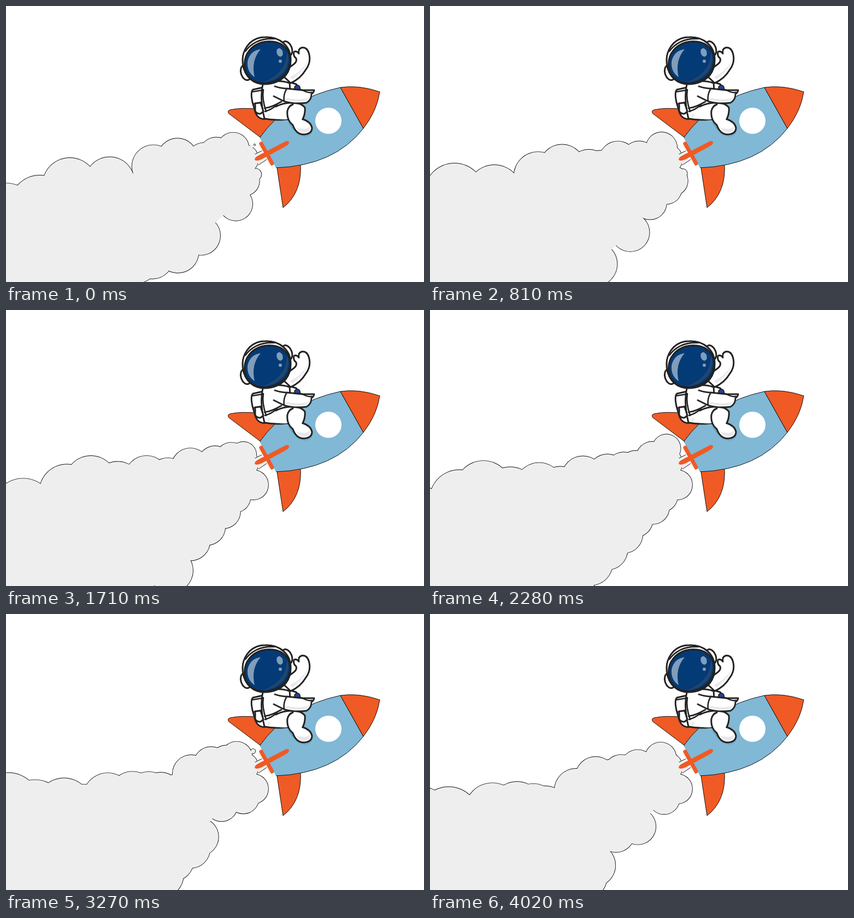
An HTML page with a canvas that plays this animation: 765x505 px, repeating every 4080 ms.

```html
<!DOCTYPE html>
<html lang="en">
<head>
<meta charset="utf-8">
<title>Rocket ride</title>
<style>
  html, body { margin: 0; width: 100%; height: 100%; overflow: hidden; background: #fff; }
  canvas, svg { position: absolute; left: 0; top: 0; }
  .edge { stroke: #111; stroke-width: 1; }
  .suit { fill: #fff; stroke: #222; stroke-width: 3; stroke-linejoin: round; stroke-linecap: round; }
  .line { fill: none; stroke: #222; stroke-width: 2.6; stroke-linecap: round; }
  .shade { fill: #e8e8e8; }
  .red { fill: #f05a24; }
</style>
</head>
<body>
<canvas id="smoke" width="765" height="505"></canvas>
<svg width="765" height="505" viewBox="0 0 765 505">
  <!-- rocket -->
  <path fill="#eee" d="M456 271L468 265L478 281L462 291Z"/>
  <path class="line" style="stroke-width:1" d="M456 271L468 265M462 291L477 281"/>
  <path class="red edge" d="M465 240L408 197Q404 192 410 190Q432 185 465 189L494 208Z"/>
  <path class="red edge" d="M496 296L507 369Q542 342 539 289Z"/>
  <path class="edge" fill="#80b8d6" d="M465 240Q515 170 612 149L654 224Q601 292 495 296Z"/>
  <path class="red edge" d="M612 149Q646 144 684 157Q679 192 654 224Z"/>
  <path stroke="#80b8d6" stroke-width="3" d="M466.500 241L495 294.500"/>
  <circle cx="590" cy="210" r="24" fill="#fff"/>
  <path class="red" d="M463 252Q464 248 469 248L491 288Q490 292 485 292Z"/>
  <path class="red" d="M455 281Q455 277 463 273L511 248Q518 245 518 250Q518 253 513 256L467 281Q457 285 455 281Z"/>

  <!-- astronaut -->
  <path fill="#6fa5c3" d="M516 213Q530 238 550 239Q561 235 561 226Z"/>
  <path class="suit" d="M470 149L452 153Q447 157 451 176L457 196Q461 206 472 207L486 204Z"/>
  <path class="suit" d="M518 139L531 143L538 152L520 160Z"/>
  <path class="suit" d="M503 124L526 107Q533 102 531 96Q525 91 527 84Q531 81 536 87Q534 78 542 76Q552 75 555 89Q558 104 549 116Q539 133 521 141Z"/>
  <path class="shade" d="M551 101Q547 117 524 134L520 130Q542 119 551 101Z"/>
  <path class="suit" d="M470 143Q464 170 473 206Q492 210 517 207L522 180L519 141Q496 133 470 143Z"/>
  <path class="shade" d="M479 197Q494 202 515 193L516 204Q495 208 478 203Z"/>
  <path class="suit" d="M485 188Q499 177 522 177Q542 177 548 187Q548 195 543 207Q558 213 560 224Q559 235 544 235Q531 234 526 219L516 207Q501 209 482 204" style="stroke:none"/>
  <path class="line" style="stroke-width:3" d="M494 184Q507 177 522 177Q541 177 547 186Q548 197 543 207Q558 212 560 223Q560 234 545 235Q531 235 525 218Q513 208 515 192Q517 183 525 180"/>
  <path class="shade" d="M532 222Q546 229 557 220Q557 230 546 232Q536 231 532 222Z"/>
  <path class="line" d="M451 157L469 154M454 179L468 176M473 187Q485 186 504 175M474 193Q485 190 496 181M471 153Q468 169 476 193"/>
  <path class="suit" d="M456 178L466 177L471 193L466 197Q459 198 456 192Z"/>
  <circle cx="533" cy="150" r="5" fill="#24439b" stroke="#222" stroke-width="2"/>
  <path class="suit" d="M492 147Q503 151 514 151L542 154L564 154Q564 158 559 161Q559 172 550 177Q528 180 508 174L490 165" style="stroke-width:2.800"/>
  <path class="shade" d="M513 168Q532 174 553 168L548 174Q526 177 513 172Z"/>
  <path class="line" d="M514 151Q507 162 509 174M541 153Q553 160 560 158"/>

  <ellipse class="suit" cx="439" cy="122" rx="9" ry="14" transform="rotate(-18 439 122)"/>
  <ellipse class="suit" cx="514" cy="78" rx="9" ry="14" transform="rotate(-22 514 78)"/>
  <path class="suit" d="M435 114C427 84 445 57 475 57C501 56 520 73 521 96C522 119 510 137 484 142C461 146 442 137 435 114Z"/>
  <path class="line" d="M438 83Q456 58 491 60"/>
  <path class="suit" style="fill:#043a76" d="M437 112C434 88 450 68 477 65C502 63 519 76 520 98C520 119 506 136 480 141C458 144 440 134 437 112Z"/>
  <path fill="#21466f" d="M514 82Q523 104 505 124Q491 138 470 140Q495 130 507 112Q514 99 514 82Z"/>
  <path fill="#809dba" d="M466 79Q446 82 442 102Q441 121 455 130Q448 100 466 79Z"/>
  <ellipse cx="501" cy="85" rx="5.500" ry="8" fill="#809dba" transform="rotate(-18 501 85)"/>
  <circle cx="502" cy="101" r="3" fill="#809dba"/>
</svg>
<script>
const LOOP = 4080, STEP = 75;
const ctx = document.getElementById('smoke').getContext('2d');

// Upper puffs, old to new: start x, start y of the crest, sink per step
const upper = [
  [7, 323, 1.3], [69, 309, 1], [124, 277, 1], [197, 275, 1.45], [277, 253, 1.28],
  [321, 241, 1.13], [370, 249, 1.24], [392, 238, 2.4], [423, 230, 1.6], [462, 226, 1.95],
  [503, 211, 1.82], [548, 206, 1.87], [578, 192, 2.2], [600, 180, 2.5], [630, 117, 4],
  [656, 148, 2.5], [692, 164, 1.8], [720, 126, 2.6], [739, 128, 2.4], [769, 119, 2.4],
  [811, 116, 2.2]
];
// Lower puffs, old to new: start x, start y of the centre
const lower = [
  [245, 462], [273, 455], [320, 445], [362, 415], [426, 357], [462, 303], [492, 277],
  [522, 249], [543, 222], [575, 200], [592, 179], [632, 121], [672, 108], [720, 57]
];

const clamp = v => Math.max(0, Math.min(1, v));

function upperPuff([x0, y0, sink], k) {
  const x = x0 - 7.2 * k;
  const r = 28 + (430 - x) * 0.07;
  return { x, y: y0 + sink * k + r, r: r * clamp((456 - x) / 25) };
}

function lowerPuff([x0, y0], k) {
  const y = y0 + 5.2 * k;
  return { x: x0 - 5.4 * k, y, r: (27 + (y - 320) * 0.085) * clamp((y - 300) / 20) };
}

function fillPuffs(puffs, grow, color) {
  ctx.fillStyle = color;
  for (const p of puffs) {
    ctx.beginPath();
    ctx.arc(p.x, p.y, p.r + grow, 0, 7);
    ctx.fill();
  }
}

function draw(k) {
  const born = p => p.r > 0;
  const top = upper.map(p => upperPuff(p, k)).filter(born).reverse();
  const bottom = lower.map(p => lowerPuff(p, k)).filter(born);
  const nozzle = [
    { x: 436, y: 280, r: 26 },
    { x: Math.min(453, 436 + 0.8 * k), y: 320, r: 27 }
  ];
  const puffs = [...top, ...bottom, ...nozzle];

  ctx.clearRect(0, 0, 765, 505);
  fillPuffs(puffs, 0.9, '#111');
  fillPuffs(puffs, 0, '#eee');

  // Solid core between both rows
  ctx.beginPath();
  for (const p of [nozzle[0], ...top, { x: -99, y: 900 }, { x: 200, y: 900 }, ...bottom, nozzle[1]]) {
    ctx.lineTo(p.x, p.y);
  }
  ctx.fill();
}

function tick() {
  const t = performance.now() % LOOP;
  draw(Math.max(1, Math.floor((t + 45) / STEP)));
  requestAnimationFrame(tick);
}
tick();
</script>
</body>
</html>
```
